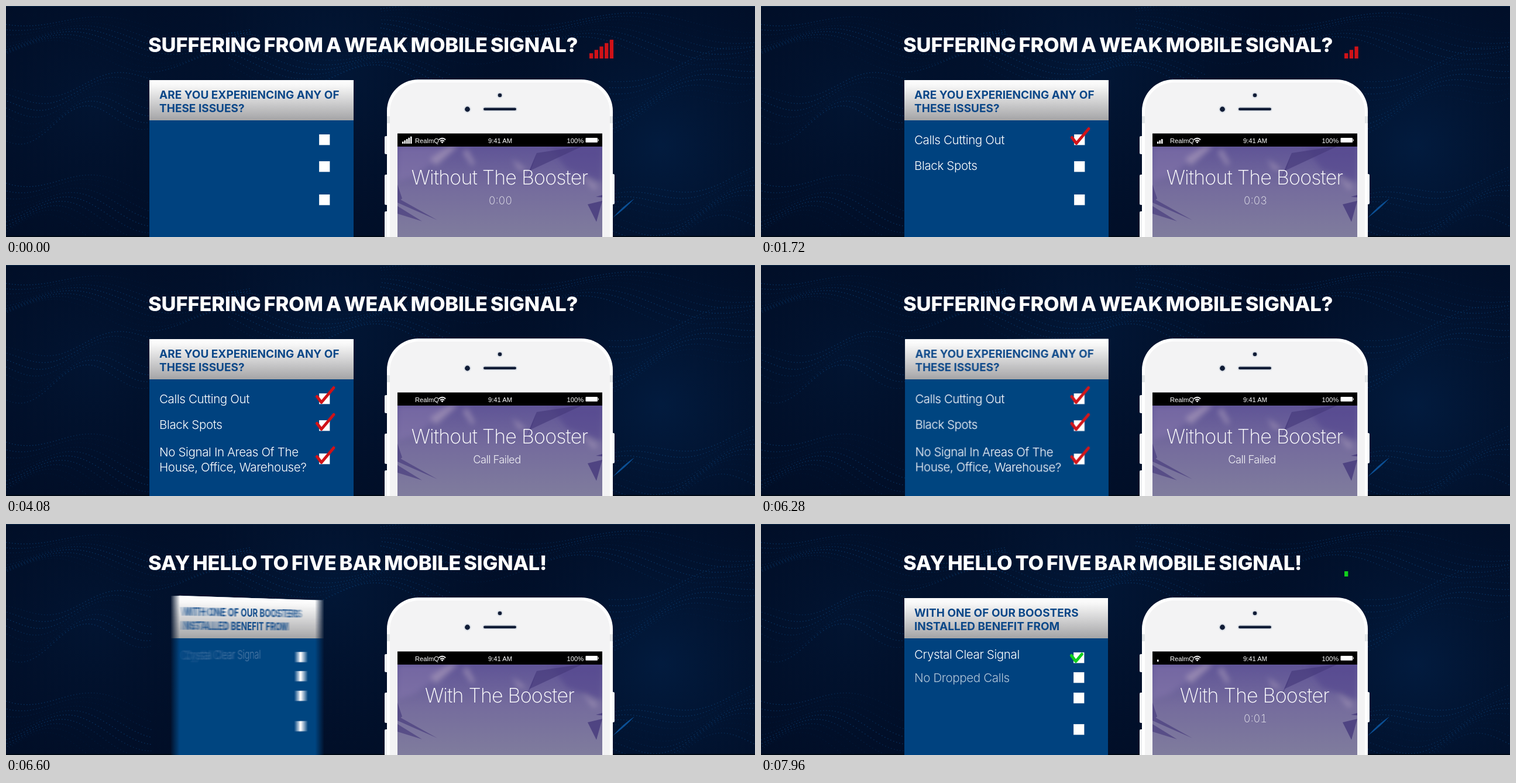
Animation, 1280 px wide and 396 px high, one loop 8000 ms. Source, as an HTML page with a canvas:

```html
<!DOCTYPE html>
<html lang="en">
<head>
<meta charset="utf-8">
<title>Mobile signal booster</title>
<style>
  html, body { margin: 0; width: 100%; height: 100%; overflow: hidden; background: #010e27; }
  #stage { position: relative; width: 1280px; height: 396px; overflow: hidden; }
  #stage > *, .card { position: absolute; left: 0; top: 0; width: 1280px; height: 396px; }
  #cards { perspective: 2500px; perspective-origin: 640px 198px; }
  .card { transform-origin: 419.5px 198px; }
  svg { display: block; width: 1280px; height: 396px; overflow: visible; }
  text { font-family: Inter, sans-serif; fill: #fff; }
  .title { font-size: 34.5px; font-weight: 800; letter-spacing: -.2px; word-spacing: -2.5px; }
  .head { font-size: 19px; font-weight: 700; fill: #0b4788; }
  .item { font-size: 20.6px; font-weight: 300; letter-spacing: -.4px; }
  .status { font: 11.2px "Liberation Sans", Arial, sans-serif; }
  .name { font-size: 34px; font-weight: 200; letter-spacing: -.8px; text-anchor: middle; }
  .call { font-size: 18.3px; font-weight: 200; text-anchor: middle; font-variant-numeric: tabular-nums; }
  .failed { letter-spacing: -.55px; font-weight: 300; }
</style>
</head>
<body>
<div id="stage">
  <canvas id="waves" width="1280" height="396"></canvas>
  <svg viewBox="0 0 1280 396">
    <defs>
      <linearGradient id="header" x2="0" y2="1">
        <stop stop-color="#fff"/><stop offset=".15" stop-color="#f6f6f6"/><stop offset="1" stop-color="#a4a4a6"/>
      </linearGradient>
      <linearGradient id="wall" x2="0" y2="1">
        <stop stop-color="#5f5496"/><stop offset=".45" stop-color="#756c9d"/><stop offset="1" stop-color="#807d9d"/>
      </linearGradient>
      <filter id="soft" x="-1" y="-1" width="3" height="3"><feGaussianBlur stdDeviation="5"/></filter>
      <clipPath id="screen"><path d="M669 241h350v160h-350z"/></clipPath>
    </defs>
    <g fill="#eef0f2">
      <rect x="647" y="223" width="8" height="31" rx="2"/>
      <rect x="647" y="289" width="8" height="52" rx="2"/>
      <rect x="647" y="352" width="8" height="52" rx="2"/>
      <rect x="1033" y="288" width="7" height="52" rx="2"/>
    </g>
    <rect x="651" y="126" width="386" height="400" rx="54" fill="#fff"/>
    <rect x="656" y="131" width="376" height="400" rx="50" fill="#f3f3f4"/>
    <path d="M651 189h5v12h-5zM1032 189h5v12h-5z" fill="#e3e6e8"/>
    <g fill="#101c36" stroke="#dde1e7" stroke-width="2">
      <circle cx="844" cy="153" r="4.3"/><circle cx="788.5" cy="177" r="5.4"/>
      <rect x="815" y="173.5" width="58" height="6.5" rx="3.2"/>
    </g>
    <g clip-path="url(#screen)">
      <path d="M669 241h350v160h-350z" fill="url(#wall)"/>
      <g filter="url(#soft)">
        <path d="M669 241h100l-70 50-30 10z" fill="#8878ad" opacity=".5"/>
        <path d="M725 262l34-22h14l-38 34zM780 250l16 24 5-4-12-24zM865 262l26 20-16-2zM984 290l28 20-8 5z" fill="#b3a5bf" opacity=".55"/>
        <path d="M930 241h89v60l-60-20z" fill="#54478e" opacity=".6"/>
      </g>
      <g fill="#45397c">
        <path d="M907 252l79-12-92 43z" opacity=".65"/>
        <path d="M907 252l-25 59 17-35z" opacity=".5"/>
        <path d="M669 329l68 38-50-22-18-8zM669 306l8 24-8 6zM669 343l42 26-42-13z" opacity=".65"/>
        <path d="M994 340l25-6-10 36zM1008 327l11-3v4z" opacity=".8"/>
      </g>
    </g>
    <path d="M669 218.5h350V241H669z"/>
    <text class="status" x="699" y="235">RealmQ</text>
    <text class="status" x="824" y="235">9:41 AM</text>
    <text class="status" x="958.5" y="235">100%</text>
    <g fill="none" stroke="#fff" stroke-width="1.8">
      <path d="M739.8 229.2q5.7-5 11.400 0M742 231.800q3.500-3 7 0"/>
    </g>
    <path d="M743.300 233.200q2.200-1.800 4.400 0l-2.200 2.300z" fill="#fff"/>
    <rect x="990.500" y="226" width="20.500" height="8" rx="1" fill="#fff"/>
    <path d="M1011.800 228.500h1.200v3h-1.200z" fill="#fff"/>
    <g id="live"></g>
  </svg>
  <div id="cards"></div>
</div>
<script>
const LOOP = 8000, STEP = 40, BLUR_COPIES = 8, SHUTTER = 15;
const FLIP_START = 6240, FLIP_HALF = 280, SWAP = FLIP_START + FLIP_HALF;
const TICK = 560, FAILED = 3920;
const BAR_LOSSES = [1120, 1680, 2240, 2800, FAILED];
const RESTART = 6840, SECOND_TICK = 7480;
const NEVER = 1e9;

const faces = [
  {
    title: 'SUFFERING FROM A WEAK MOBILE SIGNAL?', name: 'Without The Booster',
    head: ['ARE YOU EXPERIENCING ANY OF', 'THESE ISSUES?'],
    x: 535, right: 594, color: '#d01218',
    rows: [
      { y: 220, check: 920, lines: ['Calls Cutting Out'], base: 237, from: 40, to: 720 },
      { y: 266, check: 2120, lines: ['Black Spots'], base: 281, from: 1040, to: 1720 },
      { y: 323, check: 3640, lines: ['No Signal In Areas Of The', 'House, Office, Warehouse?'], base: 328, from: 2160, to: 2840 }
    ]
  },
  {
    title: 'SAY HELLO TO FIVE BAR MOBILE SIGNAL!', name: 'With The Booster',
    head: ['WITH ONE OF OUR BOOSTERS', 'INSTALLED BENEFIT FROM'],
    x: 534, right: 593, color: '#10cf1c',
    rows: [
      { y: 220, check: 7680, lines: ['Crystal Clear Signal'], base: 231, from: 6440, to: 7000 },
      { y: 254, check: NEVER, lines: ['No Dropped Calls'], base: 271, from: 7240, to: 8270 },
      { y: 289, check: NEVER, lines: [] },
      { y: 343, check: NEVER, lines: [] }
    ]
  }
];

const $ = id => document.getElementById(id);
const progress = (t, from, to) => Math.min(1, Math.max(0, (t - from) / (to - from)));
const label = (cls, x, y, text, extra = '') => `<text class="${cls}" x="${x}" y="${y}" ${extra}>${text}</text>`;
const box = (x, y, w, h, fill) => `<rect x="${x}" y="${y}" width="${w}" height="${h}" fill="${fill}"/>`;

function drawRow(row, face, t) {
  const alpha = progress(t, row.from, row.to), drawn = progress(t, row.check, row.check + 440);
  const lines = alpha > 0 ? row.lines.map((s, i) => label('item', 262, row.base + 26 * i, s, `opacity="${alpha}"`)) : [];
  const tick = drawn > 0 ? `<path d="M${face.x - 3.500} ${row.y + 5.500}l7.500 10L${face.x + 25} ${row.y - 9.500}" fill="none"
    stroke="${face.color}" stroke-width="5" stroke-linejoin="round" stroke-linecap="round"
    pathLength="1" stroke-dasharray="${drawn} 2"/>` : '';
  return lines.join('') + box(face.x, row.y, 18.500, 18.500, '#c3cddb') + box(face.x + .5, row.y + .5, 17.500, 17.500, '#fff') + tick;
}

function drawCard(face, t) {
  const w = face.right - 245;
  return '<svg viewBox="0 0 1280 396">' + box(245, 195, w, 320, '#00427f') + box(245, 127, w, 69, 'url(#header)')
    + face.head.map((s, i) => label('head', 262, 159 + 23.300 * i, s)).join('')
    + face.rows.map(row => drawRow(row, face, t)).join('') + '</svg>';
}

// Signal strength, 0 to 5
const barCount = t => t < SWAP ? BAR_LOSSES.filter(loss => t < loss).length : +(t >= SECOND_TICK);

function callText(t) {
  if (t < FAILED) return '0:0' + Math.floor(t / TICK);
  if (t < SWAP) return 'Call Failed';
  return t < RESTART ? '' : t < SECOND_TICK ? '0:00' : '0:01';
}

function drawLive(face, t) {
  let out = label('title', 243, 79, face.title) + label('name', 843.500, 305.500, face.name);
  const call = callText(t);
  out += label(call === 'Call Failed' ? 'call failed' : 'call', call === 'Call Failed' ? 839 : 845, 340, call, 'opacity=".9"');
  for (let i = 0; i < barCount(t); i++) {
    const tall = 9 + 5.800 * i, small = 3.500 + 2.200 * i;
    out += box(997 + 8.700 * i, 90 - tall, 6.300, tall, face.color) + box(677 + 3.500 * i, 236 - small, 2.500, small, '#fff');
  }
  return out;
}

// Card angle in degrees: speeds up to edge-on, then slows down
function flipAngle(t) {
  const u = progress(t, FLIP_START, FLIP_START + 2 * FLIP_HALF) * 2;
  return u < 1 ? 90 * u ** 1.74 : 180 - 90 * (2 - u) ** 1.74;
}

const copies = Array.from({ length: BLUR_COPIES }, (_, i) => {
  const div = document.createElement('div');
  div.className = 'card';
  div.style.opacity = 1 / (i + 1);
  return $('cards').appendChild(div);
});

let shown = -1;
function render(t) {
  if (t === shown) return;
  shown = t;
  const second = t >= SWAP, face = faces[+second], html = drawCard(face, t);
  const turning = t > FLIP_START && t < FLIP_START + 2 * FLIP_HALF;
  $('live').innerHTML = drawLive(face, t);
  copies.forEach((div, i) => {
    div.style.display = i && !turning ? 'none' : '';
    if (i && !turning) return;
    const angle = flipAngle(turning ? t + (i / (BLUR_COPIES - 1) - .5) * SHUTTER : t);
    const turn = second ? 180 - angle : -angle;
    div.style.transform = turn ? `rotateY(${turn}deg)` : 'none';
    div.innerHTML = html;
  });
}

function paintWaves() {
  const g = $('waves').getContext('2d');
  const glow = (x, y, r, color) => {
    const fill = g.createRadialGradient(x, y, 0, x, y, r);
    fill.addColorStop(0, color);
    fill.addColorStop(1, 'rgba(2,24,56,0)');
    g.fillStyle = fill;
    g.fillRect(0, 0, 1280, 396);
  };
  g.fillStyle = '#010e27';
  g.fillRect(0, 0, 1280, 396);
  glow(1120, 240, 330, 'rgba(3,36,78,.6)');
  glow(560, 110, 330, 'rgba(3,32,70,.5)');
  glow(150, 170, 260, 'rgba(3,30,66,.4)');
  // start, end, y, slope, amplitude, wavelength, rows, row gap
  const bands = [
    [0, 420, 20, .06, 12, 300, 9, 7], [0, 250, 150, -.12, 14, 210, 8, 9], [0, 250, 290, .1, 16, 260, 10, 10],
    [380, 760, 60, .05, 15, 330, 9, 7], [640, 1280, 12, .03, 14, 380, 8, 8],
    [1030, 1280, 130, -.25, 10, 240, 10, 8], [1030, 1280, 330, -.18, 14, 250, 12, 8]
  ];
  for (const [x0, x1, y0, slope, amp, length, rows, gap] of bands)
    for (let r = 0; r < rows; r++)
      for (let x = x0 + r % 3; x < x1; x += 5) {
        const y = y0 + r * gap + (x - x0) * slope + amp * (1 + r / rows) * Math.sin(x / length * 6.283 + r * .22 + y0);
        g.fillStyle = `rgba(15,82,145,${.3 + .22 * Math.sin(x / 70 + r + y0)})`;
        g.fillRect(x, y, 1.600, 1.300);
      }
  g.fillStyle = '#0b4f94';
  g.beginPath();
  g.moveTo(1037, 363);
  g.quadraticCurveTo(1054, 343, 1074, 330);
  g.quadraticCurveTo(1058, 348, 1037, 363);
  g.fill();
  g.fillStyle = '#0a2748';
  g.fillRect(0, 0, 1280, 1);
  g.fillStyle = '#000a18';
  g.fillRect(0, 394, 1280, 2);
}

paintWaves();
const start = performance.now();
function loop() {
  const t = (performance.now() - start) % LOOP;
  render(Math.floor(t / STEP) * STEP);
  requestAnimationFrame(loop);
}
loop();
</script>
</body>
</html>
```
